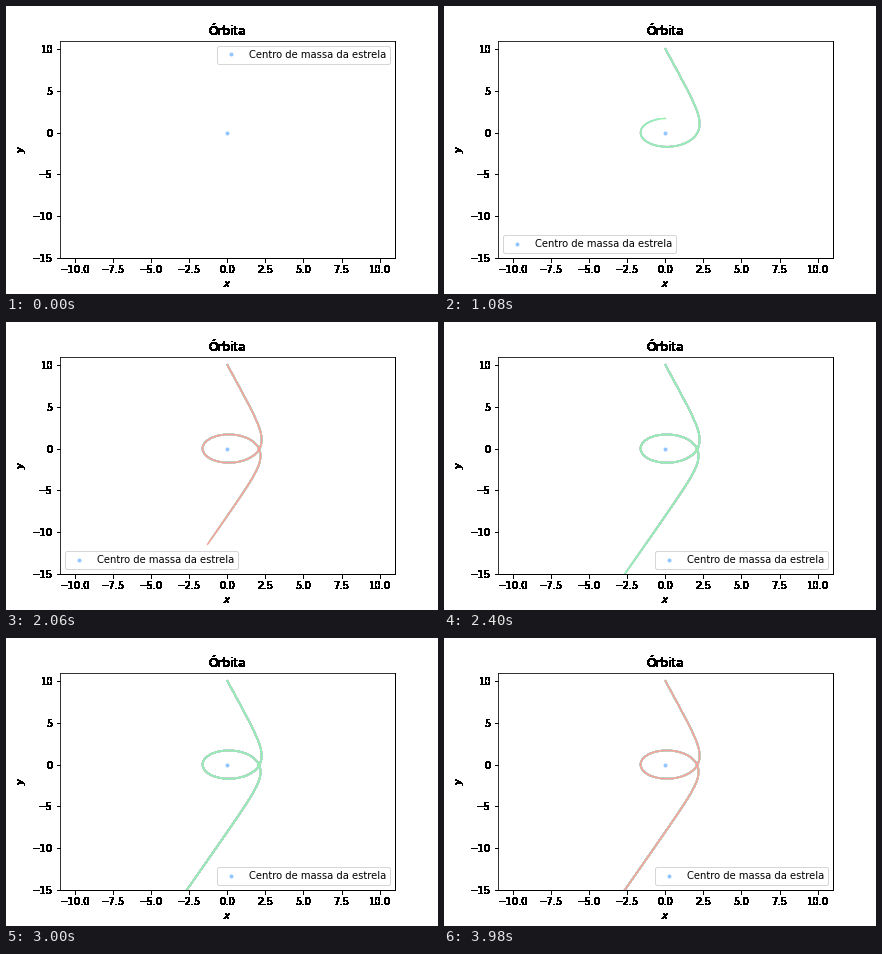
Write a matplotlib script that moves like this. It is 432 px wide and 288 px high and loops after 4 s.

```python
import numpy as np
import matplotlib.pyplot as plt
from matplotlib.animation import FuncAnimation

FRAMES, STEP = 200, 20
SUB = 5         # path points per frame
LAYERS = 48     # stacked curves, newest on top
PASTEL = ["#92C6FF", "#97F0AA", "#FF9F9A", "#D0BBFF", "#FFFEA3", "#B0E0E6"]


def cumulate(f):
    return np.concatenate([[0], np.cumsum((f[1:] + f[:-1]) / 2)])


def orbit():
    """Unbound relativistic orbit, u = R / r, sampled evenly in proper time."""
    R, u2, u3 = 1.035, 0.634, 0.666
    u1 = 1 - u2 - u3
    k2 = (u2 - u1) / (u3 - u1)

    def angle(r):
        return np.arcsin(np.sqrt((R / r - u1) / (u2 - u1)))

    s2 = np.sin(np.linspace(angle(10), np.pi - angle(60), 8000)) ** 2
    u = u1 + (u2 - u1) * s2
    rate = 1 / np.sqrt(1 - k2 * s2)
    sweep, time = cumulate(rate), cumulate(rate / u**2)

    # fix the exit point and the time of the first full turn
    x_exit, y_exit = -2.668, -15
    out = np.argmax(u)
    r_exit = np.hypot(x_exit, y_exit)
    turn = 2.5 * np.pi - np.arctan2(y_exit, x_exit)
    sweep *= turn / np.interp(-R / r_exit, -u[out:], sweep[out:])
    time *= 54 / np.interp(2 * np.pi, sweep, time)

    t = np.arange(FRAMES * SUB + 1) / SUB
    phi = np.pi / 2 - np.interp(t, time, sweep)
    r = R / np.interp(t, time, u)
    return r * np.cos(phi), r * np.sin(phi)


def harden(im, dpi):
    """Turn every touched pixel solid black."""
    im = im.copy()
    im[..., :3] = 0
    im[..., 3] = im[..., 3] > 0
    return im, 0, 0


x, y = orbit()

fig = plt.figure(figsize=(6, 4), dpi=72, facecolor="white")
fig.subplots_adjust(left=0.125, right=0.9, bottom=0.125, top=0.88)
ax = fig.add_subplot()
ax.set(xlim=(-11, 11), ylim=(-15, 11), xlabel="$x$", ylabel="$y$", title="Órbita",
       xticks=np.arange(-10, 10.1, 2.5), yticks=np.arange(-15, 11, 5))
for part in (ax.xaxis, ax.yaxis, ax.title, ax.spines["bottom"], ax.spines["right"]):
    part.set_agg_filter(harden)

ax.plot(0, 0, ".", color=PASTEL[0], label="Centro de massa da estrela")
curves = [ax.plot([], [], lw=1.5)[0] for _ in range(LAYERS)]
legend = ax.legend(loc="upper right")


def legend_corner(i):
    if i == 0:
        return "upper right"
    return "lower left" if y[i * SUB] > -12.3 else "lower right"


def update(i):
    for age, curve in enumerate(reversed(curves)):
        n = i - age
        end = n * SUB + 1 if n > 0 else 0
        curve.set_data(x[:end], y[:end])
        curve.set_color(PASTEL[(n + 1) % len(PASTEL)])
    legend.set_loc(legend_corner(i))
    return curves + [legend]


anim = FuncAnimation(fig, update, frames=FRAMES, interval=STEP,
                     init_func=lambda: update(0), repeat=True, repeat_delay=0)
plt.show()
```
